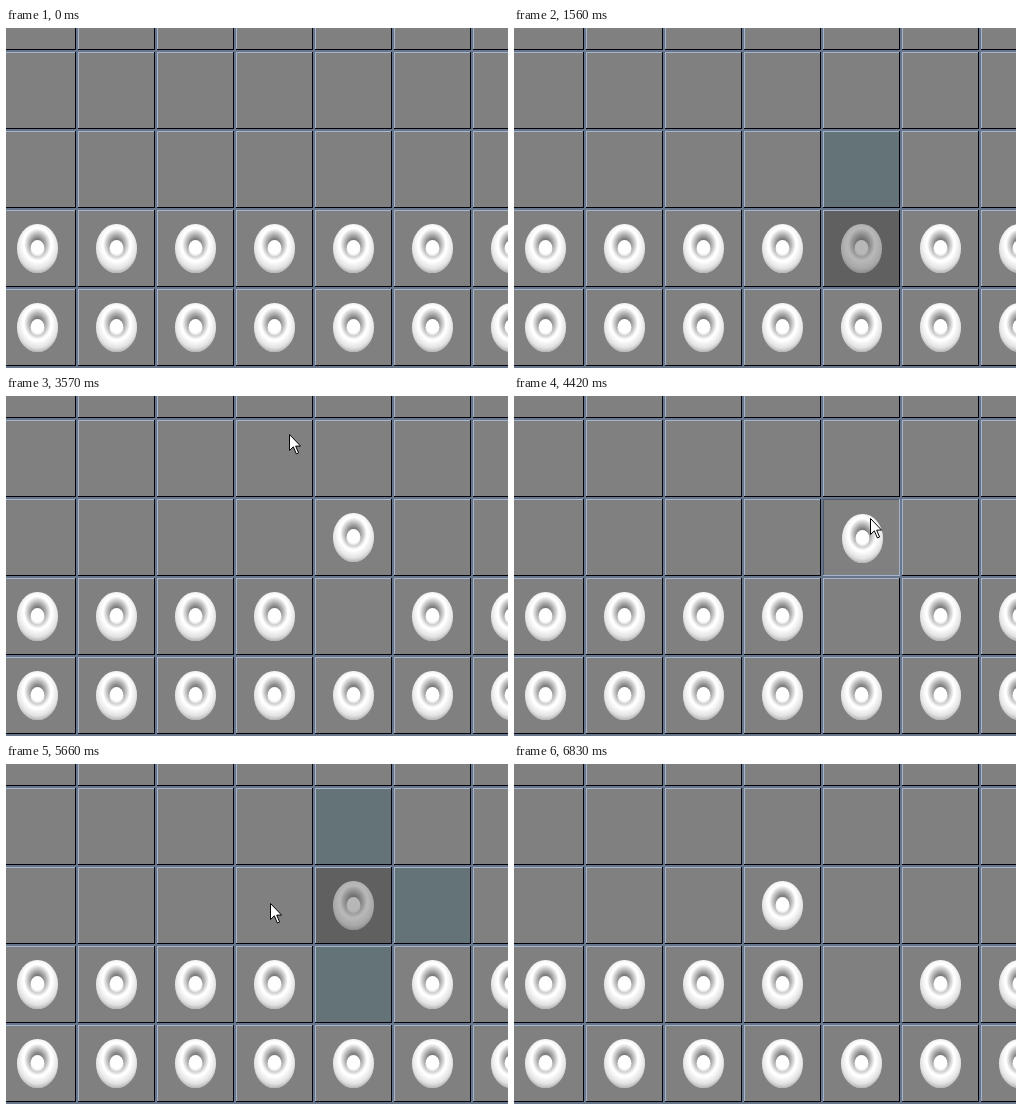
Write an HTML page with a canvas that moves like this. It is 502 px wide and 340 px high and loops after 7990 ms.

```html
<!DOCTYPE html>
<html lang="en">
<head>
<meta charset="utf-8">
<title>Board</title>
<style>
html, body { margin: 0; width: 100%; height: 100%; overflow: hidden; background: #808080; }
canvas { display: block; }
</style>
</head>
<body>
<canvas id="stage" width="502" height="340"></canvas>
<script>
const LOOP = 7990, PITCH = 79, SIZE = 77, TICK = 75;
const ctx = document.getElementById('stage').getContext('2d');
const color = { face: '#808080', gap: '#68768c', light: '#a3b4cc', dark: '#000008', sunk: '#50586a', target: '#647378', chosen: '#606060' };
const cell = (c, r) => ({ c, r });
const same = (a, b) => a.c === b.c && a.r === b.r;
const near = (a, b) => Math.abs(a.c - b.c) + Math.abs(a.r - b.r) === 1;
const within = (t, a, b) => t >= a && t < b;

// Press a piece, select it, tap a free neighbour, drop, clear the marks, land.
const home = cell(4, 3);
const moves = [
  { from: home, to: cell(4, 2), press: 680, select: 930, tap: 2160, drop: 2160, clear: 2160, land: 2640 },
  { from: cell(4, 2), to: cell(3, 2), press: 4420, select: 4500, tap: 5050, drop: 5660, clear: 5750, land: 6130 }
];

// Pointer visits: start point, then strokes with an optional sideways bow.
const visits = [
  { show: 70, hide: 1560, x: 351, y: 303, strokes: [
    { start: 70, end: 510, x: 362, y: 204, bow: 14 },
    { start: 930, end: 1310, x: 356, y: 149 },
    { start: 1310, end: 1480, x: 353, y: 49 }] },
  { show: 3570, hide: 6830, x: 283, y: 38, strokes: [
    { start: 3570, end: 3720, x: 241, y: 122 },
    { start: 3720, end: 4260, x: 356, y: 122 },
    { start: 4500, end: 5050, x: 252, y: 128 },
    { start: 5050, end: 5200, x: 264, y: 131 },
    { start: 5585, end: 5660, x: 264, y: 139 },
    { start: 6445, end: 6750, x: 280, y: 103, bow: 3 }] }
];

function radial(g, y, r, stops) {
  const grad = g.createRadialGradient(0, y, 0, 0, y, r);
  stops.forEach(([at, c]) => grad.addColorStop(at, c));
  return grad;
}

function makeRing() {
  const c = document.createElement('canvas');
  c.width = c.height = SIZE;
  const g = c.getContext('2d');
  g.translate(SIZE / 2, SIZE / 2);
  g.scale(20.5 / 24.5, 1);
  const disc = (y, r, fill) => {
    g.beginPath();
    g.arc(0, y, r, 0, 7);
    g.fillStyle = fill;
    g.fill();
  };
  const shade = a => `rgba(110,110,110,${a})`;
  disc(0, 24.5, '#fff');
  disc(0, 24.5, radial(g, -4, 29, [[0, shade(0)], [.6, shade(0)], [.84, shade(.2)], [1, shade(.55)]]));
  disc(-4, 16, radial(g, -4, 16, [[0, shade(.95)], [.35, shade(.9)], [.65, shade(.5)], [1, shade(0)]]));
  disc(0, 8.4, radial(g, -2, 10.4, [[0, '#fff'], [.7, '#fff'], [1, '#d4d4d4']]));
  return c;
}
const ring = makeRing();

function box(x, y, w, h, fill) {
  ctx.fillStyle = fill;
  ctx.fillRect(x, y, w, h);
}

function drawCell(at, t) {
  const x = at.c * PITCH - 7, y = at.r * PITCH - 55;
  const piece = moves.reduce((p, m) => t >= m.land ? m.to : p, home);
  const full = p => same(p, piece) || (p.r >= 3 && !same(p, home));
  const chosen = moves.some(m => same(at, m.from) && within(t, m.select, m.clear));
  const target = moves.some(m => near(at, m.from) && !full(at) &&
    within(t, m.select, same(at, m.to) ? m.drop : m.clear));
  const down = moves.some(m => (same(at, m.from) && within(t, m.press, m.select)) ||
    (same(at, m.to) && within(t, m.tap, m.drop)));

  box(x, y, SIZE, SIZE, down ? color.light : color.dark);
  box(x, y, SIZE - 1, SIZE - 1, down ? color.sunk : color.light);
  box(x + 1, y + 1, SIZE - 2, SIZE - 2, chosen ? color.chosen : target ? color.target : color.face);
  if (!full(at)) return;
  ctx.globalAlpha = chosen ? .55 : 1;
  ctx.drawImage(ring, x + down, y + down);
  ctx.globalAlpha = 1;
}

function pointerAt(visit, t) {
  let { x, y } = visit;
  for (const s of visit.strokes) {
    if (t < s.start) break;
    const span = s.end - s.start, steps = Math.round(span / TICK);
    const k = Math.min(1, Math.floor((t - s.start) / span * steps + .01) / steps);
    const ease = k * k * (3 - 2 * k);
    x += (s.x - x) * ease + (s.bow || 0) * Math.sin(Math.PI * k);
    y += (s.y - y) * ease;
  }
  return [Math.round(x), Math.round(y)];
}

const arrow = new Path2D('M.5 .5V16.5L4.3 12.8L7.4 20L9.6 19L6.7 12.1H11.6Z');

function drawPointer(t) {
  const visit = visits.find(v => within(t, v.show, v.hide));
  if (!visit) return;
  ctx.save();
  ctx.translate(...pointerAt(visit, t));
  ctx.fillStyle = '#fff';
  ctx.strokeStyle = '#000';
  ctx.fill(arrow);
  ctx.stroke(arrow);
  ctx.restore();
}

function draw(now) {
  const t = now % LOOP;
  box(0, 0, 502, 340, color.gap);
  for (let r = 0; r < 5; r++)
    for (let c = 0; c < 7; c++) drawCell(cell(c, r), t);
  drawPointer(t);
}

const start = performance.now();
function tick() {
  draw(performance.now() - start);
  requestAnimationFrame(tick);
}
tick();
</script>
</body>
</html>
```
